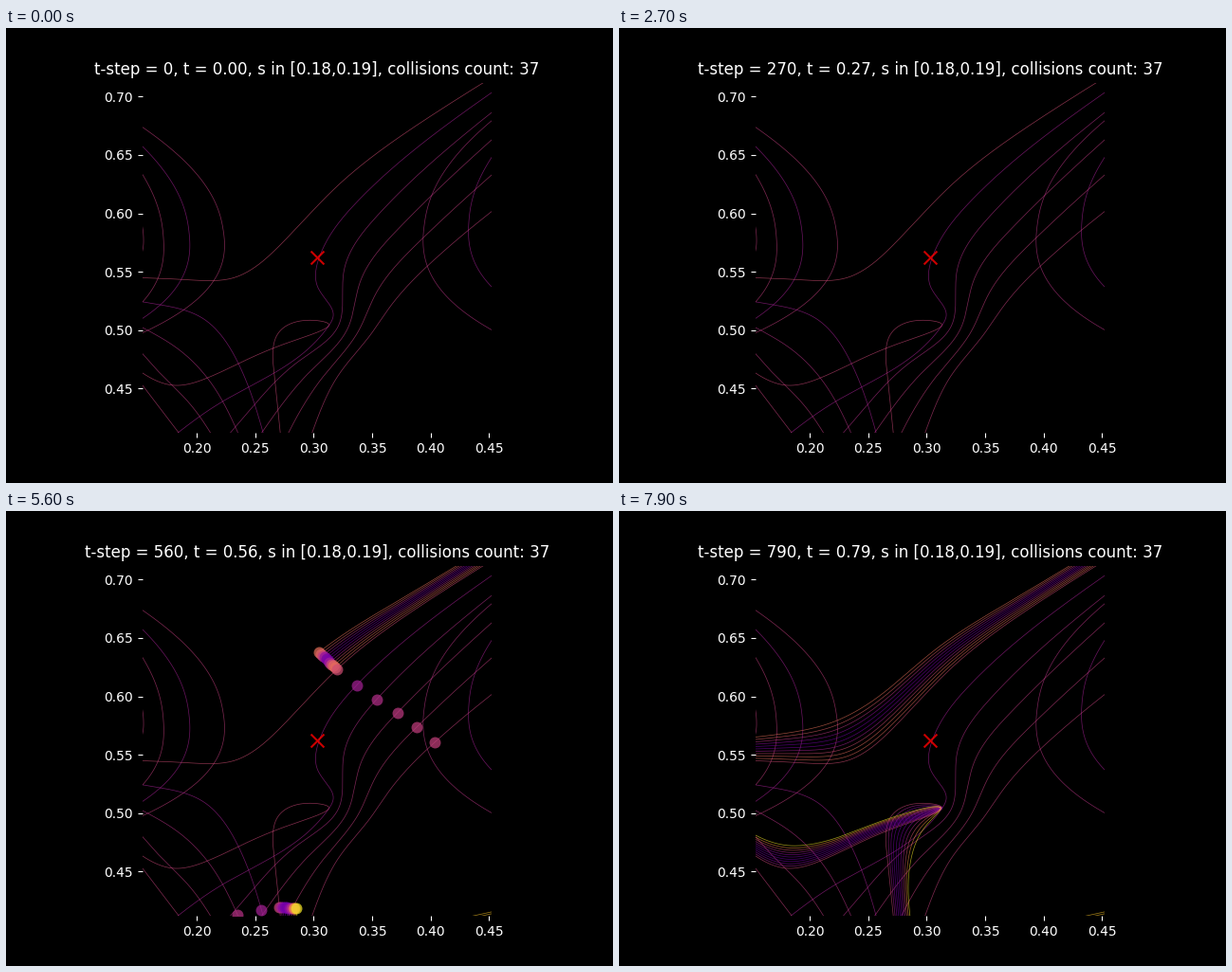
Animation of 640x480 px, one loop 8 s. Source, as a matplotlib script:

```python
import numpy as np
import matplotlib.pyplot as plt
from matplotlib.animation import FuncAnimation

FRAMES, STEP_MS = 80, 100
CENTER = np.array([0.30296, 0.5620])
HALF_X, HALF_Y = 0.1497, 0.15
SCALE = 1232.0                      # pixels per data unit
MID_PX = np.array([328.0, 242.4])
PINK, PURPLE = 0.47, 0.37
cmap = plt.get_cmap("plasma")

plt.style.use("dark_background")
fig, ax = plt.subplots(figsize=(6.4, 4.8), dpi=100)
ax.set_aspect("equal")
ax.set_xlim(CENTER[0] - HALF_X, CENTER[0] + HALF_X)
ax.set_ylim(CENTER[1] - HALF_Y, CENTER[1] + HALF_Y)
ax.spines[:].set_visible(False)
title = ax.set_title("")
rays = []


def to_data(px):
    return CENTER + (np.asarray(px, float) - MID_PX) * [1, -1] / SCALE


def spline(x, y, q):
    """Natural cubic spline through rows y at x, evaluated at q."""
    x, y, n = np.asarray(x, float), np.asarray(y, float), len(x)
    h = np.diff(x)
    slope = np.diff(y, axis=0) / h[:, None]
    a, rhs = np.eye(n), np.zeros_like(y)
    for i in range(1, n - 1):
        a[i, i - 1:i + 2] = h[i - 1], 2 * (h[i - 1] + h[i]), h[i]
        rhs[i] = 6 * (slope[i] - slope[i - 1])
    m = np.linalg.solve(a, rhs)
    i = np.clip(np.searchsorted(x, q, side="right") - 1, 0, n - 2)
    d, e, hi = (q - x[i])[:, None], (x[i + 1] - q)[:, None], h[i][:, None]
    return ((e * y[i] + d * y[i + 1]) / hi
            + (e**3 / hi - e * hi) * m[i] / 6 + (d**3 / hi - d * hi) * m[i + 1] / 6)


def stroke(tone):
    return ax.plot([], [], color=cmap(tone), lw=0.5, alpha=0.65)[0]


class Ray:
    """A smooth pixel path; keys maps point index to arrival frame."""

    def __init__(self, tone, pts, keys, fixed=True):
        self.pts, self.fixed = np.asarray(pts, float), fixed
        self.knots = np.r_[0, np.cumsum(np.hypot(*np.diff(self.pts, axis=0).T))]
        self.times = list(keys.values())
        self.dist = self.knots[list(keys)][:, None]
        self.u = np.linspace(0, self.knots[-1], 300)
        self.curve = self.at(self.u)
        self.line = stroke(tone)
        self.dot, = ax.plot([], [], "o", color=cmap(tone), ms=8.6, mew=0, alpha=0.7, zorder=3)
        if fixed:
            self.line.set_data(*self.curve.T)

    def at(self, u):
        return to_data(spline(self.knots, self.pts, u))

    def update(self, frame):
        start, end = self.times[0], self.times[-1]
        t = np.array([np.clip(frame, start, end)], float)
        s = np.clip(spline(self.times, self.dist, t)[0], 0, self.knots[-1])
        tip = self.at(s)
        self.dot.set_data(*(tip.T if start < frame < end else ([], [])))
        if not self.fixed:
            trail = np.vstack([self.curve[self.u < s], tip])
            self.line.set_data(*(trail.T if frame > start else ([], [])))


def family(guides, nodes, weights, tone, keys, fixed):
    """Rays blended by a polynomial through guide curves placed at nodes."""
    guides = np.array(guides, float)
    for w in weights:
        mix = [np.prod([(w - b) / (a - b) for b in nodes if b != a]) for a in nodes]
        rays.append(Ray(tone(w), np.tensordot(mix, guides, 1), keys, fixed(w)))


def arc(tone, edge, top, bottom, depth):
    """Skewed bow that leaves the stage edge and returns to it."""
    p = np.linspace(-1, 1, 120)
    x = edge + depth * (1 - np.abs(p) ** 2.3) * (1 + 0.2 * p)
    y = (top + bottom) / 2 + (bottom - top) / 2 * p
    stroke(tone).set_data(*to_data(np.column_stack([x, y])).T)


arc(PINK, 143, 104, 322, 86)
arc(PURPLE, 143, 124, 307, 50)
arc(PINK, 143, 153, 290, 23)
arc(PINK, 143, 206, 238, 2)
arc(0.44, 513, 97, 319, -72)
arc(PURPLE, 513, 135, 274, -25)

# hooked ray, then the fan beside it, sweeping down from the upper right
rays.append(Ray(PURPLE, [(525, 59), (370, 183.5), (331, 240), (329, 274), (345, 304),
                         (339, 316), (225, 396), (160, 444)],
                {0: 47.5, 1: 56, 4: 62.8, 6: 72, 7: 74.5}))
family([[(531, 74), (391, 198.5), (356, 258), (351, 313), (308, 352), (258, 402), (222, 444)],
        [(572, 103), (433, 228), (389, 282), (372, 319), (335, 367), (303, 417), (289, 445)],
        [(600, 128), (452, 244), (405, 294), (384, 324), (350, 367), (326, 418), (316, 446)]],
       [0, 2 / 3, 1], np.linspace(0, 1, 4), lambda w: 0.42 + 0.06 * np.sqrt(w),
       {0: 47.5, 1: 56, 3: 63, 5: 72, 6: 74.5}, lambda w: True)

# fan rising from the bottom left
family([[(275, 441), (247, 358), (207, 306), (144, 289), (114, 283)],
        [(251, 442), (218, 377), (182, 339), (144, 316), (114, 300)],
        [(205, 457), (170, 411), (144, 377), (120, 346), (100, 320)]],
       [0, 1 / 3, 1], np.linspace(0, 1, 4), lambda w: PURPLE + 0.11 * np.sqrt(w),
       {0: 55.4, 4: 62.5}, lambda w: True)

# corner pair
family([[(470, 432), (530, 419)], [(470, 434), (530, 421)]],
       [0, 1], [0, 1], lambda w: 0.88, {0: 31, 1: 33}, lambda w: False)

# upper bundle
family([[(508, 38), (418, 92), (330, 149), (272, 197), (222, 224), (182, 233.5),
         (144, 238.5), (110, 242)],
        [(535, 38), (440, 98), (349, 167), (290, 228), (240, 263.5), (190, 265.5),
         (144, 263.5), (110, 262)]],
       [0, 1], np.linspace(0, 1, 11), lambda w: 0.43 + 0.21 * np.cos(7.4 * w),
       {0: 48.5, 2: 56, 7: 62.5}, lambda w: w == 1)

# lower bundle, turning back at a sharp tip
family([[(291, 445), (283, 368), (287, 322), (315, 308.5), (340, 312), (300, 331),
         (215, 368), (178, 377), (144, 364), (115, 340)],
        [(309, 445), (306.5, 375), (313, 350), (328, 327), (339, 314.5), (300, 319.5),
         (215, 349), (180, 353), (144, 342), (115, 322)]],
       [0, 1], np.linspace(0, 1, 11), lambda w: 0.5 - 1.5 * w + 1.96 * w * w,
       {0: 55, 1: 57.9, 4: 63.1, 6: 70.5, 9: 76.5}, lambda w: w == 0)

ax.scatter(*CENTER, s=100, marker="x", color="red", alpha=0.8, zorder=5)


def update(i):
    title.set_text(f"t-step = {10 * i}, t = {i / 100:.2f}, s in [0.18,0.19], collisions count: 37")
    for r in rays:
        r.update(i)
    return [title]


anim = FuncAnimation(fig, update, frames=FRAMES, interval=STEP_MS,
                     init_func=lambda: update(0), repeat=True, repeat_delay=0)
plt.show()
```
